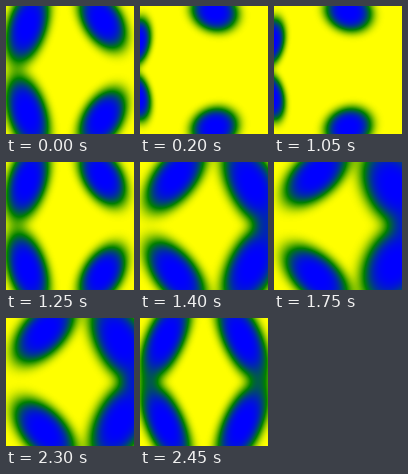
Recreate the animation shown at these times as a matplotlib script. Size 128 by 128 pixels, loop 2.5 s.

```python
import numpy as np
import matplotlib.pyplot as plt
from matplotlib.animation import FuncAnimation
from matplotlib.colors import LinearSegmentedColormap

SIZE, FRAMES, INTERVAL = 128, 50, 50
AXIS = 63  # horizontal mirror line

# Phase values at which the lobe poses are given
PHASE = np.array([-0.951, -0.482, -0.125, 0, 0.482, 0.951])

# Each pose: centre x, centre y, tilt in degrees, long and short half-axis
RIGHT = np.array([
    (120, 24, 62, 40, 27),
    (114, 23, 62, 42, 23),
    (102, 20, 65, 41, 18),
    (96, 14, 58, 30, 18),
    (74, 5, 20, 22, 18),
    (70, 6, 5, 20, 16.5),
])
LEFT = np.array([
    (42, 12, 138, 36, 20),
    (38, 13, 133, 36, 20),
    (25, 20, 114, 41, 17.5),
    (21, 19, 107, 36, 18),
    (-3, 35, 100, 22, 12),
    (-6, 34, 97, 18, 11),
])

ys, xs = np.mgrid[:SIZE, :SIZE].astype(float)


def ease(u):
    return np.tanh(2.3 * u)


def pose(keys, u):
    return [np.interp(ease(u), ease(PHASE), col) for col in keys.T]


def lobe(cx, cy, tilt, a, b):
    """Soft-edged ellipse that is one half on its outline."""
    c, s = np.cos(np.radians(tilt)), np.sin(np.radians(tilt))
    dx, dy = xs - cx, ys - cy
    q = ((dx * c + dy * s) / a) ** 2 + ((dx * s - dy * c) / b) ** 2
    return np.exp(-np.log(2) * q ** 2)


def field(i):
    u = np.sin(2 * np.pi * i / FRAMES)
    total = np.zeros_like(xs)
    for keys in (RIGHT, LEFT):
        cx, cy, tilt, a, b = pose(keys, u)
        total += lobe(cx, cy, tilt, a, b)
        total += lobe(cx, 2 * AXIS - cy, -tilt, a, b)
    return np.clip(1 - total, 0, 1)


cmap = LinearSegmentedColormap.from_list("bgy", ["blue", "green", "yellow"])
fig = plt.figure(figsize=(SIZE / 100, SIZE / 100), dpi=100)
ax = fig.add_axes([0, 0, 1, 1])
ax.axis("off")
img = ax.imshow(field(0), cmap=cmap, vmin=0, vmax=1,
                interpolation="nearest", aspect="auto")


def update(i):
    img.set_data(field(i))
    return (img,)


anim = FuncAnimation(fig, update, frames=FRAMES, interval=INTERVAL,
                     repeat=True, repeat_delay=0)
plt.show()
```
